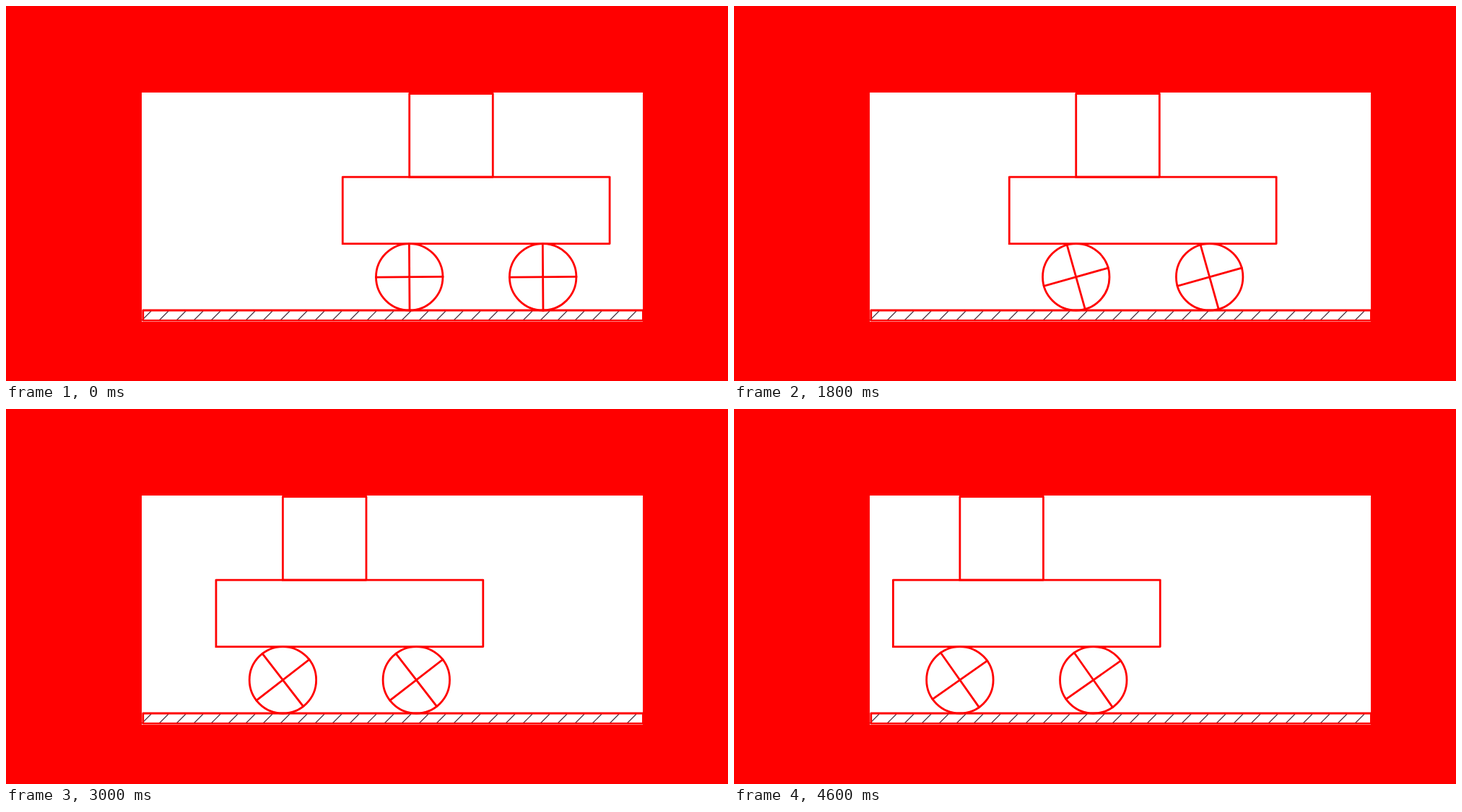
Write an HTML page that moves like this. It is 1000 by 520 pixels and loops after 5 s.

```html
<!DOCTYPE html>
<html lang="en">
<head>
<meta charset="utf-8">
<title>Rolling cart</title>
<style>
  html, body { margin: 0; width: 100%; height: 100%; overflow: hidden; background: #f00; }
  svg { display: block; width: 1000px; height: 520px; }
  .line { fill: none; stroke: #f00; stroke-width: 2.8; stroke-linejoin: round; stroke-linecap: square; }
  .hatch { stroke: #402838; stroke-width: 1.1; }
</style>
</head>
<body>
<svg viewBox="0 0 1000 520">
  <clipPath id="panel"><rect x="188" y="120" width="694" height="317.8"/></clipPath>
  <g clip-path="url(#panel)">
    <rect x="188" y="120" width="694" height="318" fill="#fff"/>
    <path id="hatch" class="hatch"/>
    <rect class="line" x="189.8" y="422" width="692.6" height="14.1"/>
    <g id="cart" class="line"></g>
  </g>
</svg>
<script>
const R = 46.23, GROUND = 422;
const START = 559.05, TRAVEL = 246.5;
const LOOP = 5000, STEP = 200, STEPS = 24;

const byId = id => document.getElementById(id);
const cart = byId('cart');

// Box path given in wheel radii, relative to the rear axle and the ground.
const box = (x, y, w, h) =>
  `<path d="M${x * R} ${GROUND - y * R}v${-h * R}h${w * R}v${h * R}h${-w * R}"/>`;

const wheel = x =>
  `<g transform="translate(${x * R} ${GROUND - R})">
    <circle r="${R}"/>
    <path class="spokes" d="M${-R} 0H${R}M0 ${-R}V${R}"/>
  </g>`;

cart.innerHTML = box(-2, 2, 8, 2) + box(0, 4, 2.5, 2.5) + wheel(0) + wheel(4);
const spokes = cart.querySelectorAll('.spokes');

let hatch = '';
for (let x = 188; x < 870; x += 24) hatch += `M${x} 436l13 -13`;
byId('hatch').setAttribute('d', hatch);

function draw(now) {
  const step = Math.min(Math.floor(now % LOOP / STEP), STEPS - 1);
  const s = (step + 0.5) / STEPS;
  const shift = TRAVEL * s * s * (3 - 2 * s);
  const angle = -shift / R * 180 / Math.PI;
  cart.setAttribute('transform', `translate(${START - shift} 0)`);
  spokes.forEach(p => p.setAttribute('transform', `rotate(${angle})`));
}

const origin = performance.now();
function tick() {
  draw(performance.now() - origin);
  requestAnimationFrame(tick);
}
tick();
</script>
</body>
</html>
```
